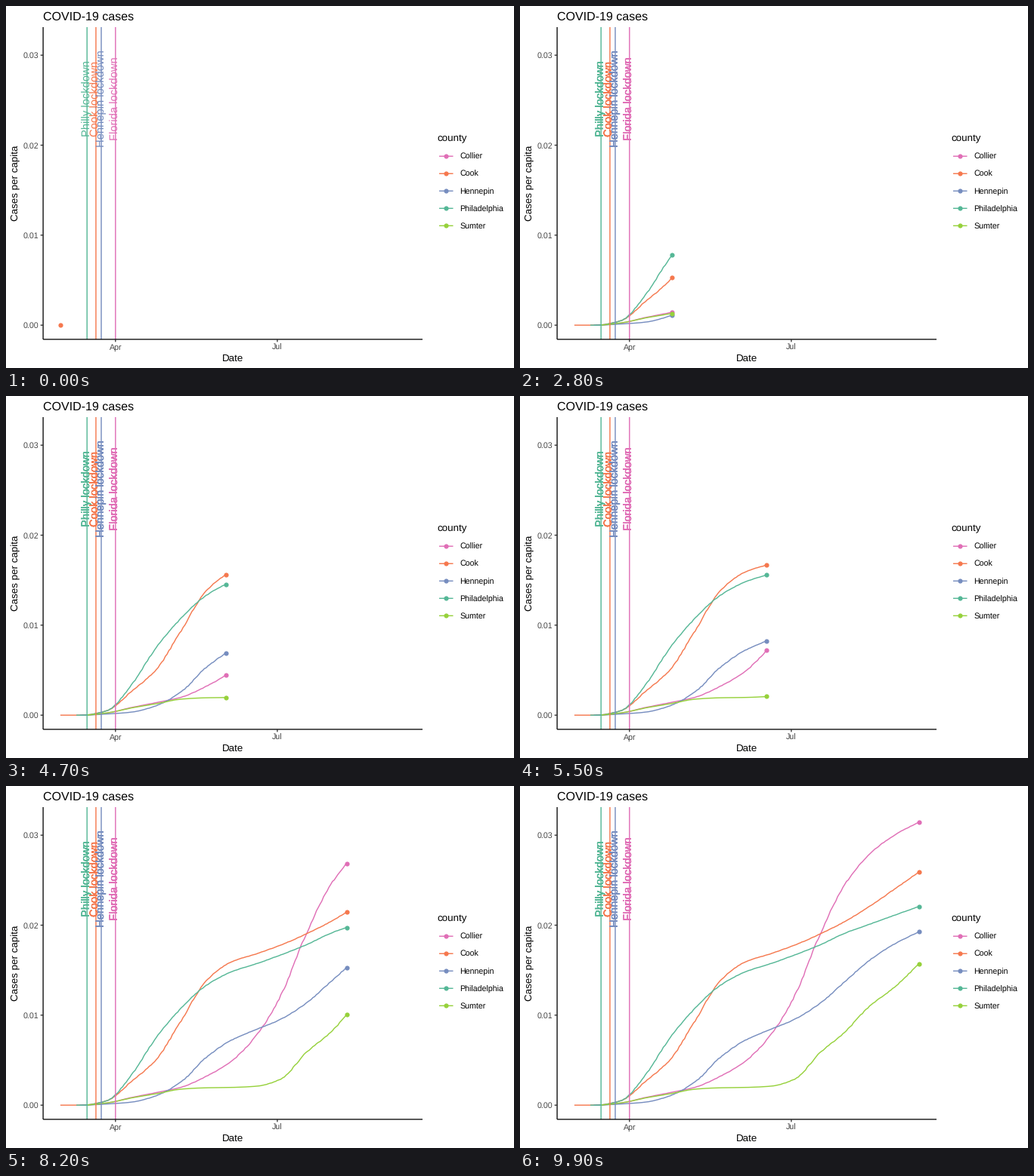
Animation of 672 by 480 pixels, one loop 10 s. Source, as a matplotlib script:

```python
import numpy as np
import matplotlib.pyplot as plt
from matplotlib.animation import FuncAnimation

plt.rcParams.update({
    "font.family": "Liberation Sans",
    "text.hinting": "none",
    "lines.solid_capstyle": "butt",
    "lines.solid_joinstyle": "round",
})

FRAMES, FIRST_KNOT, STEP, LAST_DAY = 100, 12, 14, 194
X0, DAY = 71.9, 2.3525            # stage x of 1 March, pixels per day
Y0, UNIT = 423.2, 11933           # stage y of zero, pixels per case per capita
LEFT, RIGHT, TOP, BOTTOM = 49.1, 551, 28, 442
PT = 0.75                         # points per pixel at 96 dpi
GREY = "#474747"

# County: colour, first day, fortnightly totals per 10,000 people
COUNTIES = {
    "Collier": ("#e06eb6", 12, [0, 2.3, 8.5, 14, 20, 32, 48.6, 77,
                                122, 189, 245, 279, 300, 315]),
    "Cook": ("#f5784e", 0, [0, 4.9, 26.4, 51, 94, 138, 159, 168,
                            178, 190, 204, 221, 240, 259.5]),
    "Hennepin": ("#768dbf", 11, [0, 1.3, 3.4, 10.6, 26, 53, 72, 84,
                                 95.5, 113, 137, 161, 179, 193]),
    "Philadelphia": ("#55b796", 9, [0, 4.8, 33.5, 75.4, 108, 133, 148, 157,
                                    167, 178, 191, 201, 211, 221]),
    "Sumter": ("#96d13b", 15, [0, 2.5, 8, 12.7, 17.8, 19.3, 19.7, 21,
                               29, 58, 81, 110, 131, 157.5]),
}

LOCKDOWNS = [
    ("Philly lockdown", 15, "Philadelphia"),
    ("Cook lockdown", 20, "Cook"),
    ("Hennepin lockdown", 23, "Hennepin"),
    ("Florida lockdown", 31, "Collier"),
]

rng = np.random.default_rng(19)
fig = plt.figure(figsize=(7, 5), dpi=96, facecolor="white")
ax = fig.add_axes([0, 0, 1, 1])
ax.set(xlim=(0, 672), ylim=(480, 0))
ax.axis("off")


def stroke(xs, ys, color, width=1.42, z=2):
    return ax.plot(xs, ys, color=color, lw=width * PT, zorder=z, snap=False)[0]


def dot(x, y, color, z=3):
    return ax.plot([x], [y], "o", color=color, ms=6.2 * PT, mew=0, zorder=z)[0]


def label(x, y, text, size, color="black", ha="left", angle=0, z=6):
    return ax.text(x, y, text, fontsize=size * PT, color=color, ha=ha,
                   va="baseline", rotation=angle, rotation_mode="anchor",
                   zorder=z)


def day_x(day):
    return X0 + DAY * day


def case_y(rate):
    return Y0 - UNIT * rate


def monotone(t, values):
    """Cubic Hermite curve through evenly spaced, rising values."""
    v = np.array(values, float)
    rise = np.diff(v)
    mean = 2 * rise[:-1] * rise[1:] / (rise[:-1] + rise[1:])
    slope = np.concatenate([[0], mean, rise[-1:]])
    u = np.clip((t - FIRST_KNOT) / STEP, 0, len(v) - 1)
    k = np.minimum(u.astype(int), len(v) - 2)
    s = u - k
    return (v[k] + rise[k] * s * s * (3 - 2 * s)
            + slope[k] * s * (1 - s) ** 2 - slope[k + 1] * s * s * (1 - s))


def daily(start, totals):
    """Stage height for each day, with slightly uneven reporting."""
    days = np.arange(start, LAST_DAY + 1)
    late = rng.uniform(-0.25, 0.25, len(days))
    return days, case_y(monotone(days + late, totals) / 1e4)


def draw_axes():
    stroke([LEFT, LEFT], [TOP, BOTTOM], "black", 1.3, 8)
    stroke([LEFT, RIGHT], [BOTTOM, BOTTOM], "black", 1.3, 8)
    for rate in (0, 0.01, 0.02, 0.03):
        y = case_y(rate)
        stroke([LEFT - 3.4, LEFT], [y, y], "#2b2b2b", 1.3, 8)
        label(43, y + 4, f"{rate:.2f}", 10.67, GREY, "right")
    for name, day in (("Apr", 31), ("Jul", 122)):
        x = day_x(day)
        stroke([x, x], [BOTTOM, BOTTOM + 3.4], "#2b2b2b", 1.3, 8)
        label(x, 456, name, 10.67, GREY, "center")
    label(49, 19, "COVID-19 cases", 16)
    label(300, 472, "Date", 13.33, ha="center")
    label(16.3, 235, "Cases per capita", 13.33, ha="center", angle=90)


def draw_legend():
    label(570.7, 179, "county", 13.33)
    for i, (name, (color, *_)) in enumerate(COUNTIES.items()):
        y = 199.2 + 23.04 * i
        stroke([573, 591.5], [y, y], color)
        dot(582.3, y, color)
        label(600.5, y + 4, name, 10.67)


draw_axes()
draw_legend()

series = []
for color, start, totals in COUNTIES.values():
    series.append((*daily(start, totals), stroke([], [], color),
                   dot(0, 0, color)))

# One copy of each label per county: stacked copies look bolder.
copies = [[] for _ in COUNTIES]
for text, day, county in LOCKDOWNS:
    x, color = day_x(day), COUNTIES[county][0]
    stroke([x, x], [TOP, BOTTOM], color, z=4)
    for layer in copies:
        layer.append(label(x + 4, 122.7, text, 14.7, color, "center", 90, 5))


def update(i):
    today = int(np.ceil(LAST_DAY * i / (FRAMES - 1)))
    active = 0
    for days, ys, line, head in series:
        n = max(0, today - days[0] + 1)
        line.set_data(day_x(days[:n]), ys[:n])
        head.set_visible(n > 0)
        if n:
            head.set_data([day_x(today)], [ys[n - 1]])
            active += 1
    for k, layer in enumerate(copies):
        for text in layer:
            text.set_visible(k < active)
    return []


anim = FuncAnimation(fig, update, frames=FRAMES, interval=100,
                     init_func=lambda: update(0), repeat=True, repeat_delay=0)
plt.show()
```
